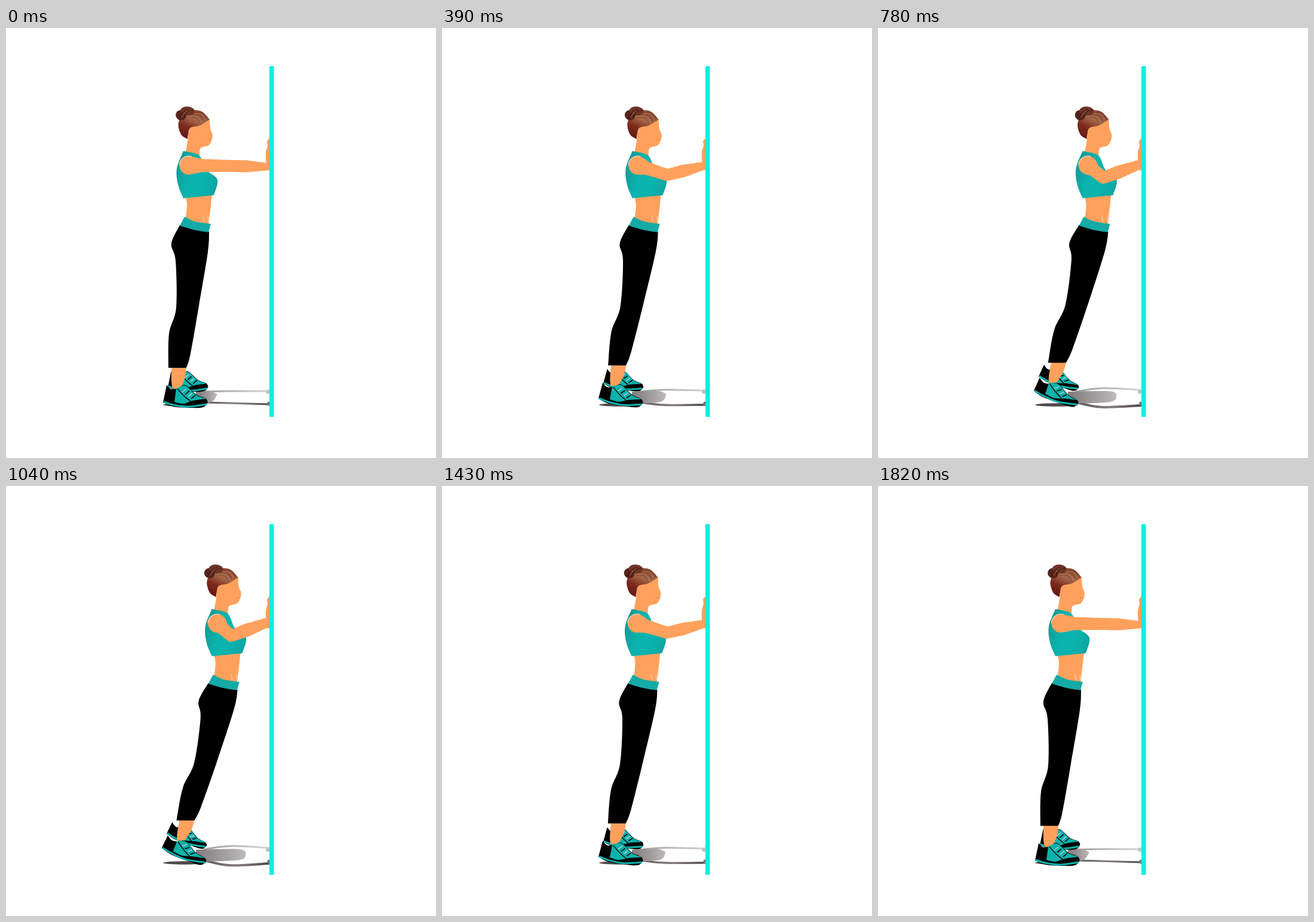
These frames come from a looping animation (720x720 px, 1.95 s). An HTML page with a canvas:

```html
<!DOCTYPE html>
<html lang="en">
<head>
<meta charset="utf-8">
<title>Wall press</title>
<style>
html, body { margin: 0; width: 100%; height: 100%; overflow: hidden; background: #fff; }
canvas { display: block; }
</style>
</head>
<body>
<canvas id="stage" width="720" height="720"></canvas>
<script>
const ctx = document.getElementById('stage').getContext('2d');
const STEP = 130, STEPS = 15, REACH = 47;
const SKIN = '#ffa15c', TEAL = '#0ab2ac', BLACK = '#000';

let lean = 0;   // horizontal travel of the upper body
let bend = 0;   // the same as a share of the full reach

function setPose(step) {
  const a = 2 * Math.PI * step / (STEPS - 1);
  lean = 24.3 * (1 - Math.cos(a)) + 2.4 * Math.sin(a) ** 2 + 1.4 * Math.sin(2 * a);
  lean = Math.max(0, lean);
  bend = lean / REACH;
}

// Warps move points of the upright pose into the current pose.
const fixed = (x, y) => [x, y];
const body = (x, y) => [x + lean, y];

function leg(x, y) {
  const k = Math.max(0, (y - 340) / 230);
  return [x + lean * (1 - 0.72 * k ** 1.15), y - 0.19 * lean * k];
}

// The heel rises while the toes stay on the floor.
function frontShoe(x, y) {
  const lift = bend ** 1.5, height = 632 - y;
  return [x - 3 * bend + lift * 0.14 * height,
          y - lift * (0.32 * Math.max(0, 330 - x) - 0.2 * height)];
}

function backShoe(x, y) {
  const [fx, fy] = frontShoe(x, y);
  return [272 + (fx - 264) * 0.9, 609 + (fy - 636) * 0.9];
}

function spline(flat, warp) {
  const pts = [];
  for (let i = 0; i < flat.length; i += 2) pts.push(warp(flat[i], flat[i + 1]));
  const at = i => pts[Math.max(0, Math.min(pts.length - 1, i))];
  ctx.lineTo(...pts[0]);
  for (let i = 0; i < pts.length - 1; i++) {
    const [a, b, c, d] = [at(i - 1), at(i), at(i + 1), at(i + 2)];
    ctx.bezierCurveTo(b[0] + (c[0] - a[0]) / 6, b[1] + (c[1] - a[1]) / 6,
                      c[0] - (d[0] - b[0]) / 6, c[1] - (d[1] - b[1]) / 6, ...c);
  }
}

// Fills the area between two smooth edges that run the same way.
function ribbon(edgeA, edgeB, warp, fill) {
  const back = [];
  for (let i = edgeB.length - 2; i >= 0; i -= 2) back.push(edgeB[i], edgeB[i + 1]);
  ctx.beginPath();
  spline(edgeA, warp);
  spline(back, warp);
  ctx.fillStyle = fill;
  ctx.fill();
}

function line(flat, warp, color, width) {
  ctx.beginPath();
  spline(flat, warp);
  ctx.strokeStyle = color;
  ctx.lineWidth = width;
  ctx.stroke();
}

function oval(x, y, rx, ry, fill, turn = 0) {
  ctx.beginPath();
  ctx.ellipse(x, y, rx, ry, turn, 0, Math.PI * 2);
  ctx.fillStyle = fill;
  ctx.fill();
}

// Tapered limb through stations of [x, y, radius].
function limb(stations, fill) {
  ctx.beginPath();
  for (let i = 0; i < stations.length - 1; i++) {
    for (let t = 0; t <= 1; t += 0.04) {
      const [x, y, r] = stations[i].map((v, j) => v + (stations[i + 1][j] - v) * t);
      ctx.moveTo(x + r, y);
      ctx.arc(x, y, r, 0, Math.PI * 2);
    }
  }
  ctx.fillStyle = fill;
  ctx.fill();
}

function gradient(x0, y0, x1, y1, ...colors) {
  const g = ctx.createLinearGradient(x0, y0, x1, y1);
  colors.forEach((c, i) => g.addColorStop(i / (colors.length - 1), c));
  return g;
}

function drawShadow() {
  const tip = 354 + REACH * bend, elbow = 374;
  line([330, 609, elbow, 608 - 5 * bend, 441, 608 - 2 * bend], fixed,
       gradient(340, 0, 441, 0, '#a5a2a3', '#d5d3d4'), 3);
  line([333, 627, elbow, 628 + 7 * bend, 441, 630 + 2 * bend], fixed,
       gradient(335, 0, 441, 0, '#62595b', '#857e80', '#4c4446'), 3 + bend);
  ribbon([318, 609, tip - 14, 608, tip, 613], [318, 629, tip - 10, 626, tip, 613], fixed,
         gradient(325, 0, tip, 0, '#858082', '#bdbabb'));
  oval(439, 609, 4, 3.5, '#c4c1c2');
  oval(440, 629, 2.5, 3.5, '#777173');
  oval(299, 631, 36, 2.8, '#51484a');
}

function drawShoe(warp) {
  ribbon([269, 598, 277, 605, 288, 603, 300, 598, 319, 614, 334, 620, 338, 627],
         [263, 627, 280, 634, 310, 636, 330, 635, 338, 627], warp, BLACK);
  ribbon([285, 604, 300, 599, 319, 615, 334, 620], [282, 626, 297, 629, 313, 624, 334, 621],
         warp, TEAL);
  line([264, 626, 280, 631, 305, 634, 336, 630], warp, TEAL, 3);
  line([287, 604, 298, 616, 309, 625], warp, BLACK, 1.4);
  for (let i = 0; i < 4; i++) {
    const x = 299 + i * 5, y = 604 + i * 3.6;
    line([x - 4, y + 6, x + 3, y], warp, i % 2 ? BLACK : '#a9cdca', 1.6);
  }
}

function drawLegs() {
  ribbon([277, 566, 277, 592, 279, 604], [302, 566, 300, 585, 292, 604], leg, SKIN);
  drawShoe(frontShoe);
  ribbon([291, 330, 277, 361, 284, 390, 285, 468, 273, 512, 272, 569],
         [340, 341, 338, 375, 323, 465, 309, 545, 302, 569], leg, BLACK);
}

function drawTorso() {
  ribbon([299, 278, 303, 297, 299, 330], [345, 278, 343, 297, 339, 330], body, SKIN);
  for (const x of [330, 338]) line([x, 315, x + 1, 325], body, '#ffc8a2', 1.4);
  ribbon([299, 316, 317, 324, 343, 328], [291, 331, 315, 338, 339, 342], body, '#14aaa5');
}

function drawHead() {
  ribbon([325, 150, 308, 168, 304, 190, 300, 212],
         [341, 153, 342, 168, 346, 181, 340, 196, 326, 201, 324, 214], body, SKIN);
  line([337, 188, 343, 187], body, '#ee8448', 1);
  ribbon([341, 153, 326, 139, 303, 140, 289, 158, 293, 178, 304, 186],
         [341, 153, 325, 163, 309, 167, 305, 178, 304, 186], body,
         gradient(320 + lean, 138, 300 + lean, 182, '#8a4a31', '#a5694a', '#7c2a1c', '#681a13'));
  for (let i = 0; i < 5; i++) {
    line([303 + i * 3, 150 - i * 2, 317 + i * 3, 150 - i * 2, 325 + i * 3, 160 - i * 2],
         body, i % 2 ? 'rgba(214,154,118,.4)' : 'rgba(92,35,24,.35)', 1.2);
  }
  oval(293 + lean, 146, 9, 8.5, '#55241b', 0.5);
  oval(304 + lean, 139, 12, 7.5, '#6e3425', 0.1);
  for (let i = 0; i < 3; i++) {
    line([290 + i * 4, 151 - i, 297 + i * 4, 141 - i, 306 + i * 4, 136 + i],
         body, i % 2 ? '#96583e' : '#41180f', 1.2);
  }
}

function drawTop() {
  ribbon([297, 206, 286, 235, 288, 262, 297, 285],
         [303, 207, 324, 214, 335, 237, 354, 254, 348, 280], body,
         gradient(286 + lean, 240, 354 + lean, 262, '#159c97', '#0ab3ad', '#0ab3ae', '#0da5a0'));
}

function drawArm() {
  const shoulder = [306 + lean, 230], elbow = [377, 231 + 20 * bend ** 0.37];
  const wrist = [443, 232.5 - 6 * bend];
  const between = (a, b, t) => a.map((v, i) => v + (b[i] - v) * t);
  limb([[...shoulder, 15.5], [...between(shoulder, elbow, 0.3), 11], [...elbow, 10],
        [...between(elbow, wrist, 0.4), 10 + bend], [...wrist, 5.5 + 2 * bend]], SKIN);
  ctx.beginPath();
  ctx.arc(...shoulder, 15.5, Math.PI, Math.PI * 1.6);
  ctx.strokeStyle = '#f3cdb8';
  ctx.lineWidth = 1.6;
  ctx.stroke();
  ribbon([441, 185, 437, 190, 438, 197, 435, 210, 436, 238], [443, 185, 443, 238], fixed, SKIN);
}

function drawWall() {
  ctx.fillStyle = '#fff';
  ctx.fillRect(441, 60, 20, 595);
  ctx.fillStyle = '#06efe2';
  ctx.fillRect(441, 64, 7.5, 587);
}

function draw(now) {
  setPose(Math.floor(now / STEP) % STEPS);
  ctx.fillStyle = '#fff';
  ctx.fillRect(0, 0, 720, 720);
  drawShadow();
  drawShoe(backShoe);
  drawLegs();
  drawTorso();
  drawHead();
  drawTop();
  drawArm();
  drawWall();
}

const start = performance.now();
function tick() {
  draw(performance.now() - start);
  requestAnimationFrame(tick);
}
tick();
</script>
</body>
</html>
```
